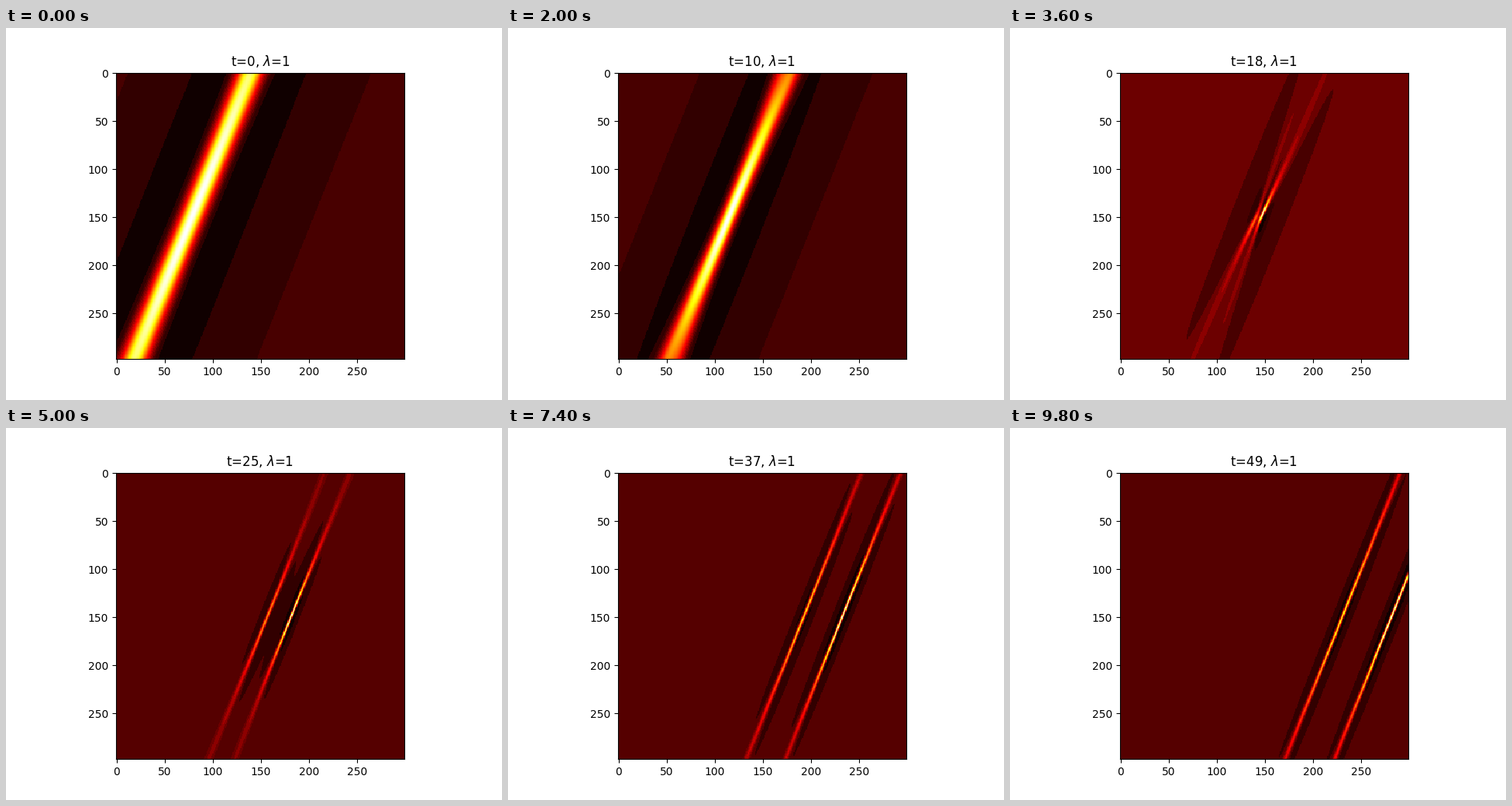
These frames come from a looping animation (640 px wide and 480 px high, 10 s). A matplotlib script:

```python
import numpy as np
import matplotlib.pyplot as plt
from matplotlib.animation import FuncAnimation
from matplotlib.colors import ListedColormap

N = 300
STEPS = 50
WIDTH = 2.0     # horizontal scale of one lump, in cells
TILT = 0.4
STRETCH = 0.27  # growth of tau along the ridge

row, col = np.mgrid[0:N, 0:N].astype(float)
row -= (N - 1) / 2


def field(t):
    """Second difference of log tau for a pair of scattering lumps."""
    x = (col + TILT * row - 78.8 - 3.62 * t) / WIDTH
    s = 5.2 * (t - 17.4)
    q = 3 + 5 * np.clip((t - 17) / 7, 0, 1)
    tau = x**4 - (2 * s - 6) * x**2 - q * x + s**2 - 2 * s + 9
    return np.diff(np.log(tau + (STRETCH * row)**2), n=2, axis=0)


def banded_hot(base):
    """The hot map with its dark reds reduced to a few flat steps."""
    rgba = plt.get_cmap("hot")(np.linspace(0, 1, 1024))
    red = rgba[:, 0] * 255
    steps = np.array([16, 50, base, 108, 140, 172, 205, 230, 255])
    edges = [38, 70, 95, 124, 156, 188, 217, 242]
    dark = rgba[:, 1] == 0
    rgba[dark, 0] = steps[np.digitize(red, edges)][dark] / 255
    return ListedColormap(rgba)


early, late = banded_hot(72), banded_hot(85)

fig, ax = plt.subplots(figsize=(6.4, 4.8), dpi=100)
image = ax.imshow(field(0), cmap=early, interpolation="nearest")
title = ax.set_title("")


def draw(t):
    u = field(t)
    image.set_data(u)
    image.set_clim(u.min(), u.max())
    image.set_cmap(early if t < 19 else late)
    title.set_text(rf"t={t}, $\lambda$=1")
    return image, title


anim = FuncAnimation(fig, draw, frames=STEPS, interval=200,
                     repeat=True, repeat_delay=0, blit=False)
plt.show()
```
